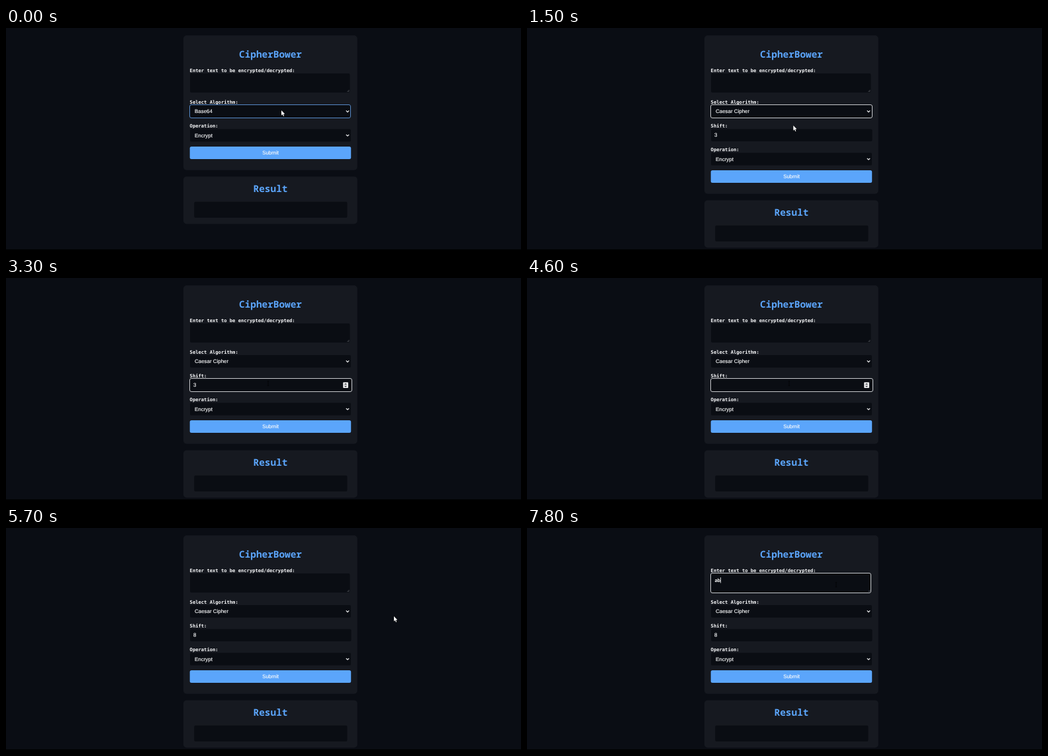
Write an HTML page with a canvas that moves like this. It is 778 px wide and 337 px high and loops after 8000 ms.

```html
<!DOCTYPE html>
<html lang="en">
<head>
<meta charset="utf-8">
<title>CipherBower</title>
<style>
html, body { margin: 0; width: 100%; height: 100%; overflow: hidden; background: #0a0d14; }
canvas { display: block; width: 778px; height: 337px; }
</style>
</head>
<body>
<canvas id="stage" width="778" height="337"></canvas>
<script>
const ctx = document.getElementById('stage').getContext('2d');
const LOOP = 8000, STEP = 100;
const PAGE = '#0a0d14', CARD = '#161920', FIELD = '#0a0d13', BLUE = '#5ba5fb';
const WHITE = '#f8f9fa', FOCUS = '#c6c8cb';
const SANS = '"Liberation Sans", Arial, sans-serif';
const TITLE = 'bold 14.4px "Noto Sans Mono", "DejaVu Sans Mono", monospace';
const LABEL = 'bold 7.15px "DejaVu Sans Mono", "Noto Sans Mono", monospace';
const TYPED = '600 7.2px "Noto Sans Mono", "DejaVu Sans Mono", monospace';
const BODY = '7.95px ' + SANS;
ctx.textRendering = 'geometricPrecision';

// Event times
const PICK = 1500, HOVER = 2200, FOCUS_SHIFT = 2700, ERASE = 4000, TYPE_SHIFT = 4800;
const BLUR = 5700, FOCUS_TEXT = 6300, TYPE_A = 7200, TYPE_B = 7600;

// Pointer stops: time, x, y
const PATH = [
  [300, 416, 125], [1100, 402.3, 148], [1900, 402.3, 148], [2400, 396, 160],
  [5300, 396, 160], [5650, 586, 134], [5750, 586, 134], [6100, 467, 86]
];

function pointer(t) {
  if (t <= PATH[0][0]) return PATH[0].slice(1);
  for (let i = 1; i < PATH.length; i++) {
    const [t0, x0, y0] = PATH[i - 1], [t1, x1, y1] = PATH[i];
    if (t <= t1) {
      const u = (t - t0) / (t1 - t0), e = u * u * (3 - 2 * u);
      return [x0 + (x1 - x0) * e, y0 + (y1 - y0) * e];
    }
  }
  return PATH[PATH.length - 1].slice(1);
}

function box(x, y, w, h, r, fill) {
  ctx.beginPath();
  ctx.roundRect(x, y, w, h, r);
  ctx.fillStyle = fill;
  ctx.fill();
}

function ring(x, y, w, h, color) {
  ctx.beginPath();
  ctx.roundRect(x + 0.5, y + 0.5, w, h, 2.5);
  ctx.strokeStyle = color;
  ctx.lineWidth = 1;
  ctx.stroke();
}

function text(str, x, y, font, color = WHITE, align = 'left') {
  ctx.font = font;
  ctx.fillStyle = color;
  ctx.textAlign = align;
  ctx.fillText(str, x, y);
}

// Small sans text with slightly firmer stems
function body(str, x, y, align) {
  text(str, x, y, BODY, WHITE, align);
  ctx.strokeStyle = WHITE;
  ctx.lineWidth = 0.15;
  ctx.strokeText(str, x, y);
}

function line(points, color, width) {
  ctx.beginPath();
  points.forEach(([x, y], i) => i ? ctx.lineTo(x, y) : ctx.moveTo(x, y));
  ctx.strokeStyle = color;
  ctx.lineWidth = width;
  ctx.stroke();
}

function shape(points, fill) {
  ctx.beginPath();
  points.forEach(([x, y]) => ctx.lineTo(x, y));
  ctx.closePath();
  ctx.fillStyle = fill;
  ctx.fill();
}

function select(y, value) {
  box(278, y, 243, 19, 2, FIELD);
  body(value, 285, y + 12.4);
  line([[513.8, y + 8.4], [516, y + 10.6], [518.2, y + 8.4]], WHITE, 1.2);
}

function spinner() {
  box(509.2, 158.2, 7.8, 8.8, 1, '#e9eaec');
  shape([[511, 161.8], [513, 159.8], [515, 161.8]], '#33363c');
  shape([[511, 163.7], [513, 165.7], [515, 163.7]], '#33363c');
}

// Blink restarts at each focus or key press
function caret(t, since, x, y) {
  if ((t - since) % 1000 < 500) {
    ctx.fillStyle = WHITE;
    ctx.fillRect(x, y, 0.8, 8.5);
  }
}

function arrow(x, y) {
  const tip = [[0, 0], [0, 7.7], [1.8, 6.1], [3, 8.9], [4.2, 8.4], [3, 5.7], [5.3, 5.6]]
    .map(([dx, dy]) => [x + dx, y + dy]);
  line([...tip, tip[0]], '#000', 0.9);
  shape(tip, '#fff');
}

function beam(x, y) {
  const c = 'rgba(0,0,0,.8)';
  line([[x, y - 3.5], [x, y + 3.5]], c, 0.8);
  line([[x - 1.3, y - 3.5], [x + 1.3, y - 3.5]], c, 0.7);
  line([[x - 1.3, y + 3.5], [x + 1.3, y + 3.5]], c, 0.7);
}

function textArea(t) {
  box(278, 69, 241.5, 29, 2, FIELD);
  line([[515.5, 97], [518.5, 94]], '#777a80', 0.6);
  line([[517.2, 97], [518.5, 95.7]], '#777a80', 0.6);
  if (t < FOCUS_TEXT) return;
  ring(277, 68, 242, 30, FOCUS);
  const value = t >= TYPE_B ? 'ab' : t >= TYPE_A ? 'a' : '';
  text(value, 283.5, 81.6, TYPED);
  const since = t >= TYPE_B ? TYPE_B : t >= TYPE_A ? TYPE_A : FOCUS_TEXT;
  caret(t, since, 283.6 + value.length * 4.32, 75);
}

function shiftInput(t) {
  const focused = t >= FOCUS_SHIFT && t < BLUR;
  const value = t < ERASE ? '3' : t < TYPE_SHIFT ? '' : '8';
  text('Shift:', 277.6, 151.2, LABEL);
  box(278, 153.5, 243.5, 18.5, 2, FIELD);
  body(value, 283, 165.3);
  if (t >= HOVER && t < BLUR) spinner();
  if (!focused) return;
  ring(277, 152, 245, 20, FOCUS);
  const since = t >= TYPE_SHIFT ? TYPE_SHIFT : t >= ERASE ? ERASE : FOCUS_SHIFT;
  caret(t, since, value ? 287.8 : 283.4, 158.2);
}

function draw(t) {
  const caesar = t >= PICK, dy = caesar ? 36 : 0;
  ctx.fillStyle = PAGE;
  ctx.fillRect(0, 0, 778, 337);

  box(268, 11.3, 262.7, 204.5 + dy, 5, CARD);
  text('CipherBower', 399.5, 45.4, TITLE, BLUE, 'center');
  text('Enter text to be encrypted/decrypted:', 277.6, 67.2, LABEL);
  textArea(t);

  text('Select Algorithm:', 277.6, 115, LABEL);
  select(117, caesar ? 'Caesar Cipher' : 'Base64');
  if (!caesar) ring(277, 116, 243, 20, '#5688c6');
  else if (t < FOCUS_SHIFT) ring(277, 116, 244, 20, FOCUS);

  if (caesar) shiftInput(t);

  text('Operation:', 277.6, 151.2 + dy, LABEL);
  select(153.4 + dy, 'Encrypt');
  box(277.7, 180 + dy, 243.5, 19, 2.5, BLUE);
  body('Submit', 399.5, 192 + dy, 'center');

  box(268, 225.4 + dy, 262.7, 72, 5, CARD);
  text('Result', 399.5, 249.4 + dy, TITLE, BLUE, 'center');
  box(284.3, 263.7 + dy, 231.2, 24.3, 2, FIELD);

  ctx.fillStyle = '#000';
  ctx.fillRect(0, 336, 778, 1);

  const [x, y] = pointer(t);
  const overShift = caesar && y > 153 && y < 172 && x < 522;
  const overText = y > 69 && y < 98 && x < 520;
  if (overShift || overText) beam(x, y);
  else arrow(x, y);
}

function tick(now) {
  draw(Math.floor((now % LOOP) / STEP) * STEP);
  requestAnimationFrame(tick);
}
requestAnimationFrame(tick);
</script>
</body>
</html>
```
